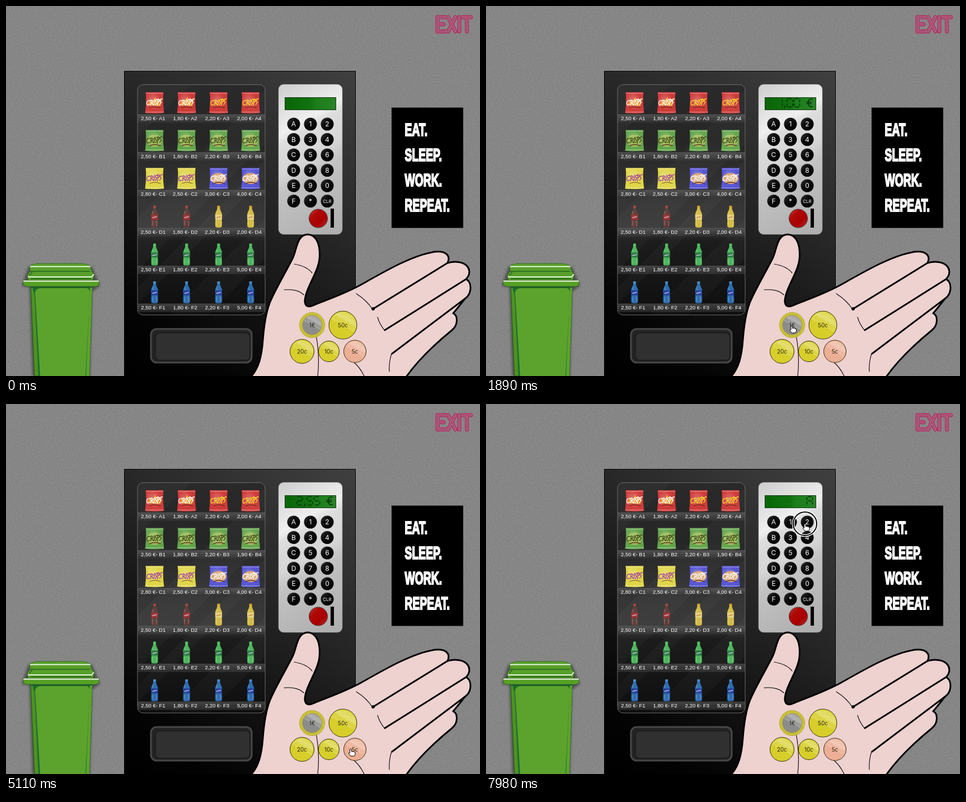
An HTML page that plays this animation: 847x661 px, repeating every 8000 ms.

```html
<!DOCTYPE html>
<html lang="en">
<head>
<meta charset="utf-8">
<title>Vending machine</title>
<style>
  html, body { margin: 0; width: 100%; height: 100%; overflow: hidden; background: #868686; }
  svg { display: block; width: 100vw; height: 100vh; }
  .price { font: 9.5px "Liberation Sans", Arial, sans-serif; fill: #fff; text-anchor: middle; }
  .key { font: 12px Inter, Roboto, sans-serif; fill: #fff; text-anchor: middle; }
  .coin { font: 10px Inter, Roboto, sans-serif; fill: #2a260c; text-anchor: middle; }
  .poster { font: bold 30.5px "Liberation Sans", Arial, sans-serif; fill: #fff; stroke: #fff; stroke-width: 2.2; }
  .line { fill: none; stroke: #000; stroke-linecap: round; stroke-linejoin: round; }
</style>
</head>
<body>
<svg viewBox="0 0 847 661" preserveAspectRatio="none">
  <defs>
    <filter id="plaster" x="0" y="0" width="1" height="1" color-interpolation-filters="sRGB">
      <feTurbulence type="fractalNoise" baseFrequency=".5" numOctaves="2" seed="4"/>
      <feColorMatrix values=".12 0 0 0 .465  .12 0 0 0 .465  .12 0 0 0 .465  0 0 0 0 1"/>
    </filter>
    <filter id="soft" x="-.2" y="-.2" width="1.4" height="1.4"><feGaussianBlur stdDeviation="2"/></filter>
    <linearGradient id="cabinet" gradientUnits="userSpaceOnUse" x1="610" y1="116" x2="221" y2="661">
      <stop stop-color="#3f3f3f"/><stop offset=".4" stop-color="#252525"/><stop offset=".85" stop-color="#040404"/><stop offset="1" stop-color="#000"/>
    </linearGradient>
    <linearGradient id="glass" x2="0" y2="1">
      <stop stop-color="#2a2a2a"/><stop offset=".25" stop-color="#262626"/><stop offset=".5" stop-color="#353535"/><stop offset=".62" stop-color="#3a3a3a"/>
      <stop offset=".68" stop-color="#1c1c1c"/><stop offset="1" stop-color="#0e0e0e"/>
    </linearGradient>
    <linearGradient id="shelf" x2="0" y2="1"><stop stop-color="#505050"/><stop offset="1" stop-color="#303030"/></linearGradient>
    <linearGradient id="steel" gradientUnits="userSpaceOnUse" x1="487" y1="140" x2="631" y2="384">
      <stop stop-color="#cdcdcd"/><stop offset=".28" stop-color="#efefef"/><stop offset=".34" stop-color="#dcdcdc"/>
      <stop offset=".5" stop-color="#d6d6d6"/><stop offset=".6" stop-color="#c2c2c2"/><stop offset="1" stop-color="#aeaeae"/>
    </linearGradient>
    <linearGradient id="lcd"><stop stop-color="#086508"/><stop offset=".5" stop-color="#12720f"/><stop offset=".6" stop-color="#1b7d19"/><stop offset="1" stop-color="#2a8428"/></linearGradient>
    <linearGradient id="keyFill" x2="1" y2="1"><stop stop-color="#333"/><stop offset=".4" stop-color="#0c0c0c"/><stop offset="1" stop-color="#000"/></linearGradient>
    <linearGradient id="red" x2="1" y2="1"><stop stop-color="#c43a36"/><stop offset=".3" stop-color="#b00a08"/><stop offset=".65" stop-color="#a80000"/><stop offset="1" stop-color="#bc2a26"/></linearGradient>
    <linearGradient id="shine" x2="1" y2="1">
      <stop stop-color="#fff" stop-opacity=".05"/><stop offset=".32" stop-color="#fff" stop-opacity=".5"/><stop offset=".42" stop-color="#fff" stop-opacity=".12"/>
      <stop offset=".5" stop-color="#fff" stop-opacity=".3"/><stop offset=".52" stop-color="#fff" stop-opacity="0"/>
    </linearGradient>
    <radialGradient id="sheen"><stop stop-color="#fff" stop-opacity=".28"/><stop offset="1" stop-color="#fff" stop-opacity="0"/></radialGradient>
    <clipPath id="window"><rect x="235" y="140" width="228" height="412" rx="10"/></clipPath>
    <path id="exit" d="M785 20H771V45.500H785M771 32.500H782M790 20L803 45.500M803 20L790 45.500M810 20V45.500M816 20H830.500M823.500 20V45.500"/>
    <path id="bag" d="M-16-19H16Q14-3 17 18Q0 20-17 18Q-14-3-16-19Z"/>
    <path id="word" fill="none" stroke-width="1.400" stroke-linecap="round" d="M-8-4Q-14-5-14 1Q-14 6-9 3M-7 4L-6-5Q0-4-5 0L-2 4M0-6L-1 3M5-6Q1-6 2-2Q5 0 1 4M5 5L6-7Q12-5 6-1M14-7Q9-7 10-3Q14-1 9 3"/>
    <path id="bottle" d="M-2.200 3H2.200Q2.400 7 4.600 11Q6.500 14 6.200 18L5.600 24Q6.500 30 5.900 37Q5 39.500 0 39Q-5 39.500-5.900 37Q-6.500 30-5.600 24L-6.200 18Q-6.500 14-4.600 11Q-2.400 7-2.200 3Z"/>
  </defs>

  <rect width="847" height="661" filter="url(#plaster)"/>

  <g aria-label="EXIT" fill="none" stroke-linecap="round" stroke-linejoin="round">
    <use href="#exit" stroke="#c4195c" stroke-width="7"/>
    <use href="#exit" stroke="#8d7a82" stroke-width="4.600"/>
    <use href="#exit" stroke="#d8246a" stroke-width="1.300"/>
  </g>

  <rect x="689" y="181.500" width="128" height="215"/>
  <g class="poster" transform="translate(712.500 0) scale(.635 1)">
    <text y="232">EAT.</text><text y="277">SLEEP.</text><text y="322">WORK.</text><text y="367">REPEAT.</text>
  </g>

  <g id="bin">
    <path d="M40 466H154L168 500L154 510L150 661H47L42 503L28 500Z" filter="url(#soft)" opacity=".4"/>
    <path d="M44 500H154L149 661H51Z" fill="#4c9222" stroke="#235c18"/>
    <path d="M47 501H152L147 661H58L51 516Z" fill="#1d6a30"/>
    <path d="M52 512Q53 505 61 504H144Q150 505 150 512L142 661H61Z" fill="#5ba32c"/>
    <path d="M150 502H154L149 661H143Z" fill="#5ba32c"/>
    <path d="M42 465Q47 460 62 460H132Q146 460 151 465L153 474L158 480L155 490H40L38 481L43 474Z" fill="#58a02a" stroke="#2a661d" stroke-width=".8"/>
    <path d="M43 465.500H151M39 484H153L157 479" fill="none" stroke="#e8f4df" stroke-width="2"/>
    <path d="M43 474H150M47 475L42 481M44 487H152" fill="none" stroke="#24651f" stroke-width="1.500"/>
    <path d="M31 490H166V498L161 501H36L31 498Z" fill="#56a027" stroke="#2a661d" stroke-width=".8"/>
    <path d="M31 491.500H166" stroke="#f0f7e9" stroke-width="2"/>
    <path d="M44 502H154" stroke="#205a20" stroke-width="2"/>
  </g>

  <rect x="211.500" y="116.500" width="413" height="560" fill="url(#cabinet)" stroke="#000"/>
  <g clip-path="url(#window)">
    <rect x="235" y="140" width="228" height="412" fill="url(#glass)"/>
    <g id="stock"></g>
    <g fill="#fff" opacity=".025">
      <path d="M235 140H330L235 235Z"/>
      <path d="M463 150V245L235 473V378Z"/>
      <path d="M463 275V305L235 533V503Z"/>
      <path d="M463 380V450L361 552H291Z"/>
    </g>
  </g>
  <rect x="235" y="140.500" width="228" height="411.500" rx="10" fill="none" stroke="#6c6c6c"/>
  <rect x="259" y="577" width="180" height="60" rx="10" fill="#242424" stroke="#484848" stroke-width="3"/>
  <rect x="267" y="584" width="169" height="49" rx="8" fill="#303030" stroke="#191919" stroke-width="1.500"/>

  <rect x="487" y="140" width="114" height="268" rx="9" fill="url(#steel)" stroke="#999" stroke-width=".5"/>
  <rect x="498.500" y="163.500" width="91" height="22" fill="url(#lcd)" stroke="#173d17"/>
  <path id="digits" fill="none" stroke="#06320a" stroke-width="1.500"/>
  <g id="keys"></g>
  <circle cx="558" cy="379.500" r="16.500" fill="url(#red)" stroke="#4a3030"/>
  <rect x="580" y="362" width="6" height="34"/>

  <path d="M436 664C452 648 457 625 459 597C461 570 464 550 471 531C481 506 502 472 513 449C520 433 520 409 539 408C557 409 562 430 560 452C558 476 534 506 534 528C535 539 543 538 551 534C578 523 610 512 636 497C675 475 728 444 767 439C786 437 795 446 789 459C806 454 826 458 828 474C828 480 826 484 822 488C833 493 833 514 820 523C812 533 806 541 799 549C808 553 808 570 797 579C770 601 738 630 714 664Z" fill="#edd2d0" stroke="#000" stroke-width="3" stroke-linejoin="round"/>
  <g class="line">
    <path d="M789 459L656 541M822 488L677 579M820 523L690 621" stroke-width="3"/>
    <circle cx="656" cy="541" r="2.500" fill="#000"/>
    <path d="M515 461Q538 465 547 477M497 507Q521 505 532 516M626 514Q645 526 655 542M664 556Q667 568 677 580M689 621Q684 636 685 653M554 588Q561 625 557 661M622 637Q632 645 640 661" stroke-width="1.100"/>
  </g>
  <g id="coins"></g>

  <g id="pointer">
    <g id="ring" fill="none"><circle stroke="#fff" stroke-width="4.500"/><circle stroke="#000" stroke-width="2"/></g>
    <path id="arrow" d="M0 0V11L2.600 8.600L4.300 12.400L6 11.600L4.400 8H8Z" stroke="#fff" stroke-width=".8"/>
    <path id="hand" d="M-1.500 1Q0-1 1.300 1V5Q3 3.800 4 5.200Q5.500 4.200 6.300 5.800Q8 5.200 8 7V10L6.500 13H0L-4 8Q-3 6-1.500 7.500Z" fill="#fff" stroke="#000" stroke-width="1"/>
  </g>
</svg>
<script>
const $ = id => document.getElementById(id);

// Shelves
const prices = [
  ['2,50', '1,80', '2,20', '2,00'], ['2,50', '1,80', '2,20', '1,90'], ['2,80', '2,50', '3,00', '4,00'],
  ['2,50', '1,80', '2,20', '2,00'], ['2,50', '1,80', '2,20', '5,00'], ['2,50', '1,80', '2,20', '5,00']
];

function bag(x, y, row, col) {
  const late = col > 1;
  const fill = ['#cf3a38', '#63a54c', late ? '#5553d2' : '#e0d548'][row];
  const ink = [late ? '#f6df2c' : '#fff', '#3b4a16', late ? '#fff' : '#a33a9c'][row];
  const burst = row === 0 && !late ? '<path d="M-13 4L-9-6L-3-4L1-11L5-5L13-6L10 6Z" fill="#eb9a35"/>'
    : row === 2 && late ? '<ellipse rx="14" ry="10" fill="#d9a877"/>'
    : row === 1 ? '<ellipse rx="13" ry="11" fill="#b9c864" opacity=".7"/>' : '';
  return `<g transform="translate(${x} ${y + 19})"><use href="#bag" fill="${fill}"/>
    <ellipse cx="-3" cy="-4" rx="14" ry="15" fill="url(#sheen)"/>${burst}
    <path d="M-15-17H15M-16 16.500H16" stroke="#fff" stroke-opacity=".3" stroke-width="1.500"/>
    <use href="#word" stroke="${ink}"/>
    <path d="M-9 9Q0 5 11 9" fill="none" stroke="${row === 2 && !late ? '#8b6b28' : '#512014'}" stroke-width="1.200"/></g>`;
}

function bottle(x, y, row, col) {
  const [body, label, cap] = row === 3
    ? (col > 1 ? ['#d4ba45', '#e5d184', '#d8a62b'] : ['#5c3c38', '#9c3030', '#a8453f'])
    : row === 4 ? ['#4bb45a', '#2f7a48', '#4fcb60'] : ['#2c6cb0', '#2645a0', '#4a8ad0'];
  return `<g transform="translate(${x} ${y})"><use href="#bottle" fill="${body}"/>
    <rect x="-2.500" y="0" width="5" height="4" rx="1" fill="${cap}"/>
    <rect x="-6" y="16" width="12" height="9" fill="${label}"/>
    <path d="M-4 21.500L4 19.500" stroke="${row === 3 && col > 1 ? '#c46b24' : '#e9e9f2'}" stroke-width="1.500" opacity=".75"/>
    <path d="M-3 10V15M-3.500 27V36M3.500 27V36" stroke="#fff" stroke-width="1.200" opacity=".25"/></g>`;
}

let stock = '';
prices.forEach((list, row) => {
  const top = 154 + row * 67.6;
  stock += `<rect x="235" y="${top + 39.5}" width="228" height="15" fill="url(#shelf)" opacity="${row > 3 ? .75 : 1}"/>`;
  list.forEach((price, col) => {
    const x = 265.5 + col * 57.2;
    stock += (row < 3 ? bag : bottle)(x, top, row, col) +
      `<text class="price" x="${x - 2.5}" y="${top + 50}">${price} €- ${'ABCDEF'[row]}${col + 1}</text>`;
  });
});
$('stock').innerHTML = stock;

// Keypad and coins
const targets = [];
$('keys').innerHTML = 'A 1 2 B 3 4 C 5 6 D 7 8 E 9 0 F * CLR'.split(' ').map((label, i) => {
  const x = 514 + i % 3 * 30, y = 211 + Math.floor(i / 3) * 27.5;
  targets.push([x, y, 12]);
  const size = label === 'CLR' ? ' style="font-size:8px"' : '';
  return `<circle cx="${x}" cy="${y}" r="11.500" fill="url(#keyFill)"/>
    <text class="key" x="${x}" y="${y + (size ? 3 : 4.3)}"${size}>${label}</text>`;
}).join('');

$('coins').innerHTML = [
  ['1€', 547, 570, 22.5, '#c9c036'], ['50c', 602, 570, 25, '#d7ce2a'], ['20c', 529, 617, 21.5, '#d7ce2a'],
  ['10c', 577, 617, 18.5, '#d7ce2a'], ['5c', 623.5, 617, 20, '#ecae94']
].map(([label, x, y, r, fill]) => {
  targets.push([x, y, r]);
  const euro = label === '1€';
  const disc = (radius, color, edge) => `<circle cx="${x}" cy="${y}" r="${radius}" fill="${color}" stroke="${edge}"/>`;
  return disc(r, fill, euro ? '#b5ac31' : '#37330f') + (euro ? disc(17.5, '#8c8c8c', '#a6a23f') : '') +
    `<circle cx="${x}" cy="${y}" r="${euro ? 17 : r - 1.5}" fill="url(#shine)" transform="rotate(75 ${x} ${y})" opacity=".7"/>
    <text class="coin" x="${x}" y="${y + 3.6}">${label}</text>`;
}).join('');

// Segment display, right aligned
const bars = {
  a: [1.5, 0, 'h7'], b: [10, 1.2, 'v5.1'], c: [10, 8.7, 'v5.1'], d: [1.5, 15, 'h7'],
  e: [0, 8.7, 'v5.1'], f: [0, 1.2, 'v5.1'], g: [1.5, 7.5, 'h7']
};
const glyphs = { 0: 'abcdef', 1: 'bc', 2: 'abged', 5: 'afgcd', A: 'abcefg' };
const widths = { ',': 6, ' ': 10, '€': 13 };

function segments(text) {
  let x = 586, path = '';
  for (const ch of [...text].reverse()) {
    x -= widths[ch] || 12.5;
    if (ch === ',') path += `M${x + 2} 178v2.500l-1.500 2`;
    else if (ch === '€') path += `M${x + 11} 167q-8-3-8 6t8 6.500M${x - 1} 171.500h10M${x - 1} 174.500h10`;
    else for (const s of glyphs[ch] || '') {
      const [dx, dy, run] = bars[s];
      path += `M${x + dx} ${dy + 165.5}${run}`;
    }
  }
  return path;
}

// Timeline
const LOOP = 8000, STEP = 70;
const shown = [[0, ''], [1890, '1,00 €'], [2800, '2,00 €'], [3850, '2,50 €'], [4690, '2,55 €'], [7140, 'A']];
const clicks = [[980, 1260], [1680, 1890], [2590, 2800], [3640, 3850], [4480, 4690], [6790, 7140], [7840, LOOP]];
const moves = [
  [70, 640, 661], [910, 547, 572], [1260, 546.5, 571], [3010, 546.5, 571], [3220, 625, 617], [3430, 599, 570],
  [4060, 599, 570], [4410, 616, 616], [5110, 616, 616], [5810, 545, 330], [6020, 545, 330], [6510, 517, 205],
  [7420, 517, 205], [7630, 545, 314], [7840, 570, 214]
];

function position(t) {
  const i = moves.findIndex(m => m[0] > t);
  if (i < 0) return moves[moves.length - 1].slice(1);
  if (i === 0) return moves[0].slice(1);
  const [t0, x0, y0] = moves[i - 1], [t1, x1, y1] = moves[i];
  const p = (t - t0) / (t1 - t0), k = p * p * (3 - 2 * p);
  return [x0 + (x1 - x0) * k, y0 + (y1 - y0) * k];
}

const show = (el, on) => el.setAttribute('visibility', on ? 'visible' : 'hidden');

function draw(ms) {
  const t = Math.floor(ms / STEP) * STEP;
  const [x, y] = position(t);
  const over = t >= 1260 && targets.some(([cx, cy, r]) => Math.hypot(x - cx, y - cy) < r);
  const click = clicks.find(([from, to]) => t >= from && t < to);
  $('digits').setAttribute('d', segments(shown.filter(s => s[0] <= t).pop()[1]));
  $('pointer').setAttribute('transform', `translate(${x} ${y})`);
  show($('arrow'), t >= STEP && !over);
  show($('hand'), over);
  show($('ring'), !!click);
  if (click) {
    const r = Math.min(21, 14 + (t - click[0]) / STEP * 4);
    for (const c of $('ring').children) c.setAttribute('r', r);
  }
}

const start = performance.now();
function tick() {
  draw((performance.now() - start) % LOOP);
  requestAnimationFrame(tick);
}
tick();
</script>
</body>
</html>
```
